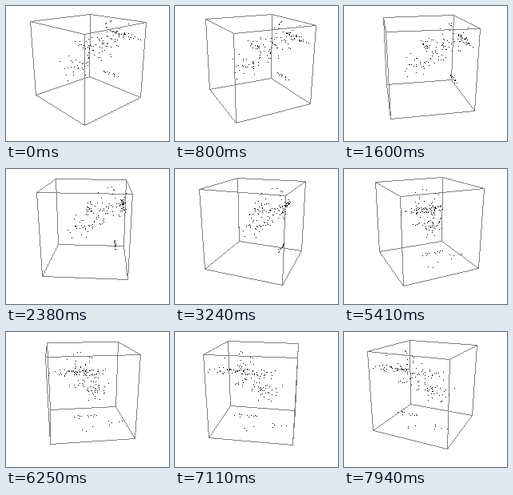
A matplotlib script that plays this animation: 204x169 px, repeating every 8000 ms.

```python
import numpy as np
import matplotlib.pyplot as plt
from itertools import combinations, product
from matplotlib.animation import FuncAnimation

W, H, DPI = 204, 169, 64
FRAMES, STEP = 160, 50            # 8 s loop
CX, CY, FOCAL, DIST = 102, 68.4, 324, 4.7
TILT = np.radians(18)
START, SPEED = -2.5, -20          # degrees, degrees per second
HALF = np.sqrt(0.5)
GREY, BLACK = 128, 0
LATE, FLOOR = 3.4, -0.5           # points under FLOOR appear at LATE seconds

rng = np.random.default_rng(7)


def strand(p, q, n, spread, bias=1):
    """Points strewn from p to q; a bias above 1 crowds them near p."""
    u = rng.random((n, 1)) ** bias
    points = np.array(p) + u * np.subtract(q, p)
    return np.clip(points + rng.normal(0, spread, (n, 3)), -HALF, HALF)


def project(points, t):
    a, b, h = points.T
    turn = np.radians(45 + START + SPEED * t)
    x = a * np.sin(turn) + b * np.cos(turn)
    z = a * np.cos(turn) - b * np.sin(turn)
    depth = DIST - z * np.cos(TILT) - h * np.sin(TILT)
    up = h * np.cos(TILT) - z * np.sin(TILT)
    return np.column_stack((CX + FOCAL * x / depth, CY - FOCAL * up / depth))


def plot(img, xy, shade):
    col, row = np.rint(xy).astype(int).T
    img[row, col] = shade


def draw_line(img, p, q):
    p, q = np.rint(p), np.rint(q)
    n = int(np.abs(q - p).max()) + 1
    plot(img, np.linspace(p, q, n), GREY)


corners = np.array(list(product((-HALF, HALF), repeat=3)))
edges = [(i, j) for i, j in combinations(range(8), 2)
         if np.count_nonzero(corners[i] != corners[j]) == 1]

# Coordinates are two floor axes and the height
cloud = np.vstack((
    strand((0.62, 0.6, 0.45), (0, 0.6, 0.47), 32, 0.03),
    strand((0.25, 0.5, 0.52), (-0.25, -0.2, -0.25), 85, 0.13, 1.4),
    strand((-0.5, 0, 0.28), (0.4, 0.03, 0.28), 14, 0.03),
    strand((-0.1, 0.5, -0.34), (0.32, 0.5, -0.34), 11, 0.02),
    strand((0.2, 0.45, -0.65), (-0.6, 0.4, -0.52), 8, 0.04),
))


def render(frame):
    t = frame * STEP / 1000
    img = np.full((H, W, 3), 255, np.uint8)
    box = project(corners, t)
    for i, j in edges:
        draw_line(img, box[i], box[j])
    shown = cloud if t >= LATE else cloud[cloud[:, 2] > FLOOR]
    plot(img, project(shown, t), BLACK)
    return img


fig = plt.figure(figsize=(W / DPI, H / DPI), dpi=DPI, facecolor="white")
view = fig.figimage(render(0), origin="upper")


def update(frame):
    view.set_data(render(frame))
    return [view]


anim = FuncAnimation(fig, update, frames=FRAMES, interval=STEP,
                     repeat=True, repeat_delay=0)
plt.show()
```
